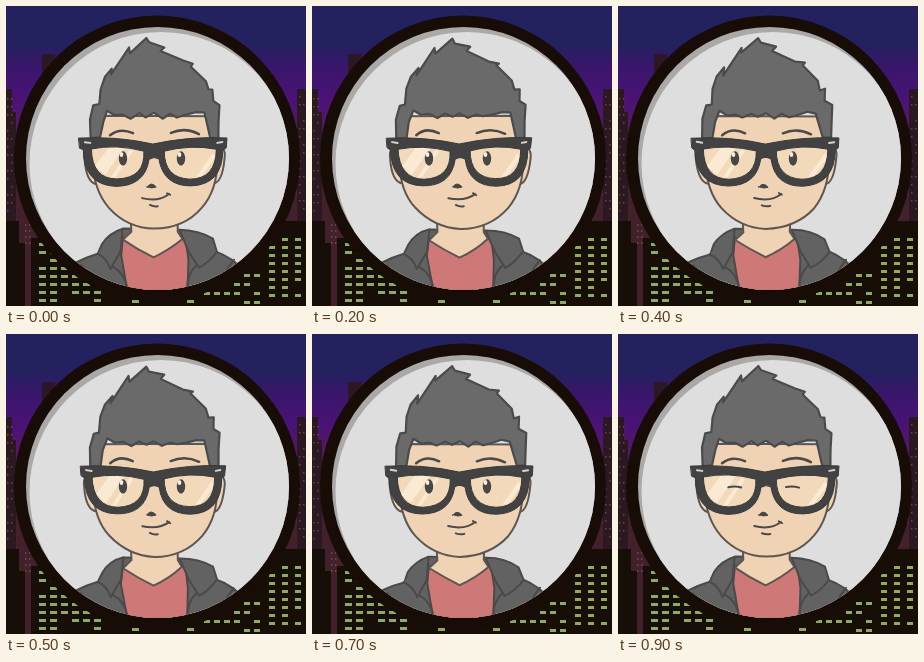
An HTML page for the animation above (1 s loop, 300 px wide and 300 px high).

```html
<!DOCTYPE html>
<html lang="en">
<head>
<meta charset="utf-8">
<title>Avatar</title>
<style>
html, body { margin: 0; width: 100%; height: 100%; overflow: hidden; background: #170e08; }
svg { display: block; width: 100%; height: 100%; }
</style>
</head>
<body>
<svg id="stage" viewBox="0 0 300 300">
  <defs>
    <clipPath id="disc"><circle cx="151.5" cy="152.5" r="131.5"/></clipPath>
    <linearGradient id="sky" x2="0" y2="1">
      <stop offset="0" stop-color="#24215f"/>
      <stop offset=".13" stop-color="#24215f"/>
      <stop offset=".19" stop-color="#371769"/>
      <stop offset=".3" stop-color="#491376"/>
      <stop offset=".42" stop-color="#581963"/>
      <stop offset=".65" stop-color="#572042"/>
    </linearGradient>
  </defs>
  <rect width="300" height="300" fill="url(#sky)"/>
  <g id="city"></g>
  <circle cx="151" cy="152.5" r="143" fill="#170d06"/>
  <circle cx="151.5" cy="152.5" r="131.5" fill="#aaa9a8"/>
  <g clip-path="url(#disc)">
    <circle cx="155" cy="157.5" r="131.5" fill="#dedede"/>
    <g id="avatar"></g>
  </g>
</svg>
<script>
const $ = id => document.getElementById(id);
const rect = (x, y, w, h, fill) =>
  `<rect x="${x}" y="${y}" width="${w}" height="${h}" fill="${fill}"/>`;
const noise = n => {
  const v = Math.sin(n * 12.9898) * 43758.5453;
  return v - Math.floor(v);
};

function windows(x, y, cols, rows, dx, dy, w, h, fill, density) {
  let out = '';
  for (let r = 0; r < rows; r++)
    for (let c = 0; c < cols; c++)
      if (noise(x + c * 17 + r * 31 + 1) < density)
        out += rect(x + c * dx, y + r * dy, w, h, fill);
  return out;
}

const DARK = '#170e08', LIT = '#8dab66';
$('city').innerHTML =
  rect(36, 48, 13, 60, '#2c1725') + rect(0, 83, 6, 220, '#2b1820') +
  rect(6, 106, 4, 190, '#2b1820') + rect(10, 160, 26, 140, '#42202c') +
  rect(291, 83, 9, 217, '#2b1820') + rect(281, 190, 10, 110, '#42202c') +
  windows(1, 92, 2, 15, 4, 8, 1.5, 1.5, '#65453c', .6) +
  windows(293, 90, 2, 15, 4, 8, 1.5, 1.5, '#65453c', .6) +
  windows(19, 212, 2, 5, 4, 6, 1.5, 2, '#6b453c', .7) +
  rect(0, 215, 13, 85, DARK) + rect(0, 237, 19, 63, DARK) +
  rect(25, 232, 275, 68, DARK) + rect(264, 215, 36, 30, DARK) +
  windows(33, 237, 6, 8, 11, 8, 7, 3, LIT, .75) +
  windows(263, 232, 3, 8, 13, 8, 6, 3, LIT, .85) +
  windows(198, 268, 6, 4, 10, 9, 6, 3, LIT, .6) +
  windows(104, 294, 9, 1, 11, 8, 7, 3, LIT, .6);

// Each pose redraws the same outlines with a slightly different hand.
function drawPose(pose, blink) {
  let seed = pose * 101;
  const shake = (d, amount) => d.replace(/\d+(\.\d+)?/g, n =>
    (+n + (noise(++seed) - .5) * amount).toFixed(2));
  const path = (d, fill, stroke = '#4b4a49', width = 2, amount = 1.1) =>
    `<path d="${shake(d, amount)}" fill="${fill}" stroke="${stroke}" stroke-width="${width}"/>`;
  const line = (d, width = 2, stroke) => path(d, 'none', stroke, width, .7);
  const skin = '#efd3b4', edge = '#5d5651', coat = '#626262';
  const eye = x => blink
    ? line(`M${x - 7} 153 Q${x} 152 ${x + 6} 153.5`, 2)
    : `<ellipse cx="${x}" cy="152.5" rx="4.2" ry="7.2" fill="#494745"/>
       <ellipse cx="${x - 1.5}" cy="148.5" rx="1.8" ry="2.6" fill="#f6eee2"/>`;

  const lensL = 'M85 143 Q110 138 138 145 Q139 172 111 173 Q86 173 85 143Z';
  const lensR = 'M158 145 Q184 138 210 143 Q210 173 184 173 Q158 172 158 145Z';
  const frame = 'M73 132 Q111 130 147 138 Q184 130 221 132 L220 142 L217 144 ' +
    'Q217 179 185 180 Q157 180 153 153 Q148 150 143 153 Q139 180 110 180 ' +
    'Q78 179 77 144 L74 142Z ';
  const squeeze = pose === 2 ? .98 : 1;

  return `<g stroke-linejoin="round" stroke-linecap="round">` +
    path('M117 223 Q103 227 96 238 L92 248 Q70 254 52 268 L45 300 L255 300 ' +
      'L240 266 Q226 251 211 246 L207 233 Q193 224 174 224Z', coat) +
    path('M117 231 L115 250 L124 300 L181 300 L182 254 L179 231 L148 249Z', '#cf7878') +
    path('M125 212 L125 226 L117 234 Q132 244 148 251 Q163 244 176 233 L172 226 L172 212Z', skin, edge) +
    path('M117 223 L115 246 L105 263 Q101 252 92 248', coat) +
    path('M174 225 L183 246 L193 262 Q204 256 211 246', coat) +
    line('M107 261 Q120 268 122 286') + line('M190 260 Q181 267 181 286') +
    line('M75 259 Q84 267 86 285') + line('M228 254 Q218 265 215 282') +
    path('M88 141 Q76 139 78 153 Q80 176 90 178', skin, edge) +
    path('M209 141 Q220 139 218 153 Q216 176 208 178', skin, edge) +
    path('M88 110 L87 155 Q88 185 103 202 Q122 222 148 223 Q178 222 196 202 ' +
      'Q211 184 211 155 L210 110Z', skin, edge) +
    path('M84 132 L84 113 L88 100 L93 98 L94 83 L99 71 L106 62 L105 69 L123 42 ' +
      'L124 47 L140 32 L143 37 L158 41 L154 45 L177 55 L187 57 L185 60 L200 75 ' +
      'L202 84 L207 83 L207 95 L214 99 L213 116 L213 132 L204 132 L198 107 ' +
      'L190 106 L179 109 L171 111 L164 108 L156 112 L148 107 L140 111 L133 107 ' +
      'L125 112 L117 108 L109 109 L101 105 L97 116 L94 132Z',
      '#6a6a6a', '#4b4b4b', 2.2, 1.5) +
    line('M104 129 Q114 121 127 127', 2.5) + line('M165 127 Q179 121 193 128', 2.5) +
    `<g transform="translate(${147 * (1 - squeeze)}) scale(${squeeze} 1)">` +
    path(lensL, '#f1d9ba', 'none') + path(lensR, '#f1d9ba', 'none') +
    `<path d="M89 160 L104 140 L118 142 L99 169Z M105 171 L123 144 L127 145 L109 172Z
      M190 171 L207 147 L209 152 L196 170Z" fill="#fae9d3"/>` +
    `<g fill-rule="evenodd">` + path(frame + lensL + lensR, '#424242', '#393939', 1, .8) + `</g>` +
    line('M79 136 L84 137', 2, '#d7d4cf') + line('M211 137 L216 136', 2, '#d7d4cf') +
    `</g>` + eye(117) + eye(175) +
    path('M141 181 Q145 175 150 181 Q146 183 141 181Z', '#494745', '#494745', 1, .6) +
    line('M136 192 Q153 196 163 188', 2) + line('M161 187 L164 189', 1.8) +
    line('M144 199 Q148 201 152 200', 2) + `</g>`;
}

$('avatar').innerHTML = [[0], [1], [2], [0, true]]
  .map(([pose, blink]) => `<g>${drawPose(pose, blink)}</g>`).join('');
const poses = [...$('avatar').children];

function render(now) {
  const step = Math.floor(now / 100) % 10;
  const shown = step === 9 ? 3 : step % 3;
  poses.forEach((g, i) => g.style.display = i === shown ? '' : 'none');
  requestAnimationFrame(render);
}
render(performance.now());
</script>
</body>
</html>
```
